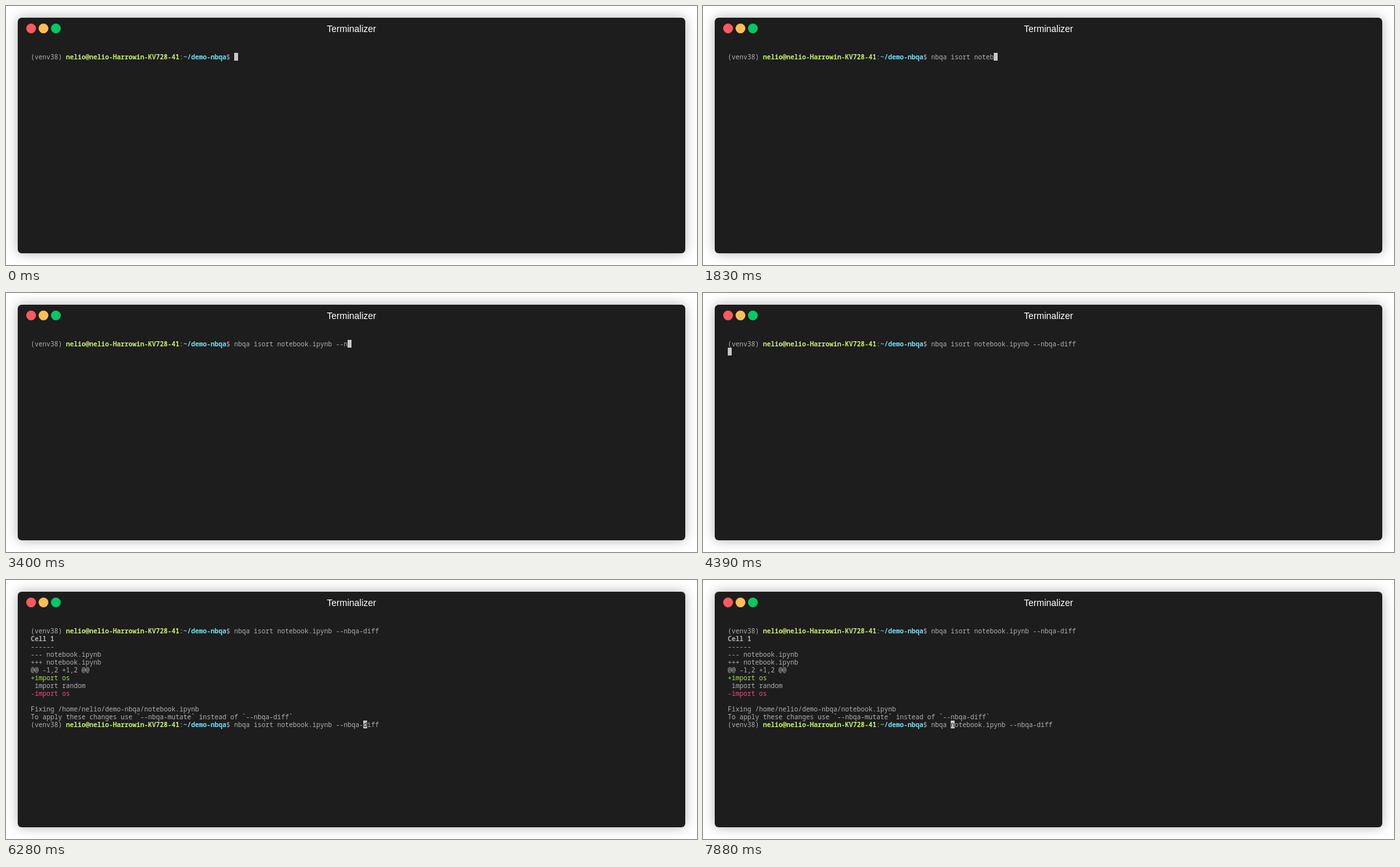
Recreate the animation shown at these times as an HTML page. Size 1060 px wide and 398 px high, loop 8000 ms.

```html
<!DOCTYPE html>
<html lang="en">
<head>
<meta charset="utf-8">
<title>Terminal</title>
<style>
html, body { margin: 0; width: 100%; height: 100%; overflow: hidden; background: #fff; }
.window { position: absolute; inset: 18px; border-radius: 6px; background: #1d1d1d;
  box-shadow: 0 0 18px rgba(0, 0, 0, .3); }
.dots { position: absolute; left: 13px; top: 9px; display: flex; gap: 4px; }
.dots i { width: 15px; height: 15px; border-radius: 50%; }
.title { position: absolute; top: 9px; width: 100%; text-align: center; color: #fff;
  font: 14px/16px "Liberation Sans", Arial, sans-serif; }
pre { position: absolute; left: 20px; top: 54px; margin: 0; color: #afafaf;
  font: 10px/12px "Noto Sans Mono", monospace; font-variant-ligatures: none; }
pre div { height: 12px; }
.user { color: #c8ed71; }
.path { color: #75dff2; }
.add { color: #b3e33b; }
.del { color: #fc4384; }
.cursor { display: inline-block; width: 6px; height: 12px; vertical-align: top;
  background: #c7c7c7; color: #1d1d1d; }
</style>
</head>
<body>
<div class="window">
  <div class="dots">
    <i style="background:#ff5a5f"></i><i style="background:#ffbe56"></i><i style="background:#06c864"></i>
  </div>
  <div class="title">Terminalizer</div>
  <pre id="screen"></pre>
</div>
<script>
const LOOP = 8000;
const TYPE_START = 100, TYPE_END = 4250;
const ENTER = 4390, OUTPUT = 4850, PROMPT = 4890, ERASE = 7880;
const jumpTimes = [5780, 6280, 6440, 6800, 7160]; // recall, then one word left each

const screen = document.getElementById('screen');
const command = 'nbqa isort notebook.ipynb --nbqa-diff';
const prompt = '(venv38) <b class="user">nelio@nelio-Harrowin-KV728-41</b>:<b class="path">~/demo-nbqa</b>$ ';
const output = `<b>Cell 1</b>
------
--- notebook.ipynb
+++ notebook.ipynb
@@ -1,2 +1,2 @@
<span class="add">+import os</span>
 import random
<span class="del">-import os</span>

Fixing /home/nelio/demo-nbqa/notebook.ipynb
To apply these changes use \`--nbqa-mutate\` instead of \`--nbqa-diff\``.split('\n');

const keyGap = (TYPE_END - TYPE_START) / (command.length - 1);
const wordStarts = [...command.matchAll(/\w+/g)].map(m => m.index);
const stops = [...wordStarts, command.length].reverse();

const withCursor = (text, col) =>
  text.slice(0, col) + `<span class="cursor">${text[col] || ' '}</span>` + text.slice(col + 1);

function typed(t) {
  const n = Math.floor((t - TYPE_START) / keyGap + 1);
  return Math.max(0, Math.min(command.length, n));
}

function edited(t) {
  if (t >= ERASE) return withCursor(command.replace('isort ', ''), command.indexOf('isort'));
  const jumps = jumpTimes.filter(time => time <= t).length;
  return jumps ? withCursor(command, stops[jumps - 1]) : withCursor('', 0);
}

function lines(t) {
  if (t < ENTER) return [prompt + withCursor(command.slice(0, typed(t)), typed(t))];
  const last = t < PROMPT ? withCursor('', 0) : prompt + edited(t);
  return [prompt + command, ...(t < OUTPUT ? [] : output), last];
}

let shown = '';
function draw(now) {
  const html = lines(now % LOOP).map(line => `<div>${line}</div>`).join('');
  if (html !== shown) screen.innerHTML = shown = html;
  requestAnimationFrame(draw);
}
draw(performance.now());
</script>
</body>
</html>
```
